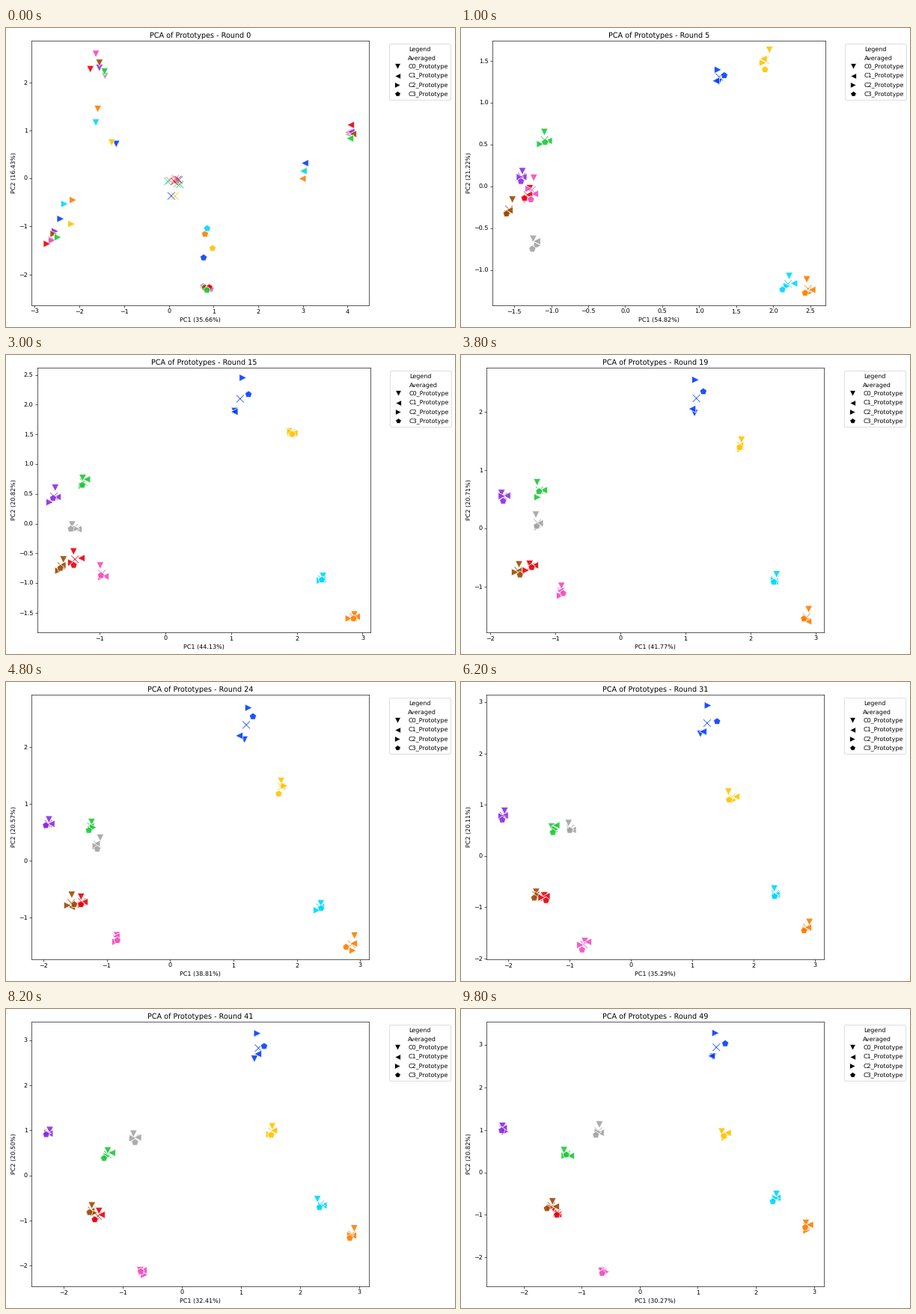
These frames come from a looping animation (600 px wide and 400 px high, 10000 ms). A matplotlib script:

```python
import numpy as np
import matplotlib.pyplot as plt
from matplotlib.animation import FuncAnimation
from matplotlib.lines import Line2D

W, H, DPI = 600, 400, 100
ROUNDS = 50
TOP, BOTTOM = 17, 370.6
K = 0.576  # point sizes relative to the matplotlib defaults

plt.rcParams.update({
    "font.family": "DejaVu Sans",
    "font.size": 10 * K,
    "text.hinting": "none",
    "axes.linewidth": 0.8 * K,
    "axes.labelpad": 3.5 * K,
    "axes.titlepad": 5 * K,
    "patch.linewidth": 1.0 * K,
})
for axis in ("xtick", "ytick"):
    plt.rcParams[f"{axis}.major.size"] = 3.5 * K
    plt.rcParams[f"{axis}.major.pad"] = 3.5 * K
    plt.rcParams[f"{axis}.major.width"] = 0.8 * K

SOURCES = [("Averaged", "x"), ("C0_Prototype", "v"), ("C1_Prototype", "<"),
           ("C2_Prototype", ">"), ("C3_Prototype", "p")]

# Where each class starts (one spot per client)
FAR = [(-1.58, 2.35), (3.98, 0.97), (-2.55, -1.25), (0.9, -2.25)]
MID = [(-1.66, 1.32), (3.0, 0.12), (-2.18, -0.51), (0.88, -1.1)]
NEAR = [(-1.24, 0.67), (3.03, 0.27), (-2.17, -0.9), (0.83, -1.55)]

# Colour, start, then the class centre at each of the later stops
STOPS = (0, 5, 15, 49)
CLASSES = [
    ("#a3a3a3", FAR, (-1.22, -0.68), (-1.38, -0.07), (-0.71, 0.97)),
    ("#f14cc1", FAR, (-1.26, -0.04), (-0.96, -0.84), (-0.63, -2.34)),
    ("#8b2be2", FAR, (-1.40, 0.12), (-1.69, 0.46), (-2.35, 1.02)),
    ("#9f4800", FAR, (-1.57, -0.27), (-1.58, -0.71), (-1.52, -0.79)),
    ("#023eff", NEAR, (1.27, 1.31), (1.14, 2.10), (1.32, 2.94)),
    ("#ffc400", NEAR, (1.89, 1.51), (1.92, 1.53), (1.46, 0.89)),
    ("#ff7c00", MID, (2.47, -1.22), (2.86, -1.57), (2.88, -1.27)),
    ("#00d7ff", MID, (2.20, -1.16), (2.38, -0.93), (2.34, -0.60)),
    ("#e8000b", FAR, (-1.32, -0.10), (-1.37, -0.60), (-1.43, -0.95)),
    ("#1ac938", FAR, (-1.09, 0.56), (-1.24, 0.70), (-1.26, 0.43)),
]
COLORS = [c[0] for c in CLASSES]
BLUE = COLORS.index("#023eff")

# How the clients sit around a class centre; blue stays more spread out
TIGHT = np.array([(0, 0.09), (0.03, 0), (-0.01, -0.04), (-0.02, -0.05)])
WIDE = np.array([(-0.06, -0.23), (-0.08, -0.18), (0.01, 0.32), (0.13, 0.09)])

START = np.array([c[1] for c in CLASSES])
START = START + np.random.default_rng(3).normal(0, 0.08, START.shape)
CENTRES = np.array([c[2:] for c in CLASSES])

# Explained variance at a few rounds
VAR_ROUNDS = (0, 5, 15, 24, 31, 41, 49)
VAR1 = (35.66, 54.82, 44.13, 38.81, 35.29, 32.41, 30.27)
VAR2 = (16.43, 21.22, 20.82, 20.57, 20.11, 20.50, 20.82)


def cluster(stop):
    """Client positions (class, client, xy) at a stop."""
    if stop == 0:
        return START
    pts = CENTRES[:, stop - 1, None] + TIGHT
    pts[BLUE] += WIDE * min(STOPS[stop] / 15, 1) - TIGHT
    return pts


def path(n):
    i = min(np.searchsorted(STOPS, n, side="right") - 1, len(STOPS) - 2)
    u = (n - STOPS[i]) / (STOPS[i + 1] - STOPS[i])
    ease = 1 - (1 - u) ** 1.4
    a, b = cluster(i), cluster(i + 1)
    return a + (b - a) * ease


def jitter(n):
    """Training noise that leaves each class average in place."""
    noise = np.random.default_rng(n).normal(0, 0.035, START.shape)
    return noise - noise.mean(axis=1, keepdims=True)


def padded(v):
    pad = 0.05 * (v.max() - v.min())
    return v.min() - pad, v.max() + pad


fig = plt.figure(figsize=(W / DPI, H / DPI), dpi=DPI, facecolor="white")
ax = fig.add_axes([0.1, 0.1, 0.7, 0.8])

layers = []
for i, (_, marker) in enumerate(SOURCES):
    edge = {} if marker == "x" else {"edgecolors": "white"}
    layers.append(ax.scatter(np.zeros(10), np.zeros(10), s=150 * K * K, c=COLORS,
                             marker=marker, alpha=0.9, linewidths=K,
                             zorder=2 + 0.1 * i, **edge))

handles = [Line2D([0], [0], marker=m, color="w", label=name, markerfacecolor="k",
                  markersize=10 * K, markeredgewidth=K, linewidth=1.5 * K)
           for name, m in SOURCES]
ax.legend(handles=handles, title="Legend", labelspacing=0.53,
          bbox_to_anchor=(1.05, 1), loc="upper left")


def update(n):
    base = path(n)
    pts = base + jitter(n)
    groups = [pts.mean(axis=1)] + [pts[:, c] for c in range(4)]
    for layer, xy in zip(layers, groups):
        layer.set_offsets(xy)

    ax.set_xlim(padded(base[..., 0]))
    low, high = padded(base[..., 1])
    ax.set_ylim(low, high)

    # half-unit tick labels are wider and push the axes to the right
    left, right = (42, 487) if high - low < 4.5 else (34.4, 485)
    ax.set_position([left / W, 1 - BOTTOM / H, (right - left) / W, (BOTTOM - TOP) / H])

    ax.set_title(f"PCA of Prototypes - Round {n}")
    ax.set_xlabel(f"PC1 ({np.interp(n, VAR_ROUNDS, VAR1):.2f}%)")
    ax.set_ylabel(f"PC2 ({np.interp(n, VAR_ROUNDS, VAR2):.2f}%)")
    return layers


anim = FuncAnimation(fig, update, frames=ROUNDS, init_func=lambda: update(0),
                     interval=200, repeat=True, repeat_delay=0, blit=False)
plt.show()
```
